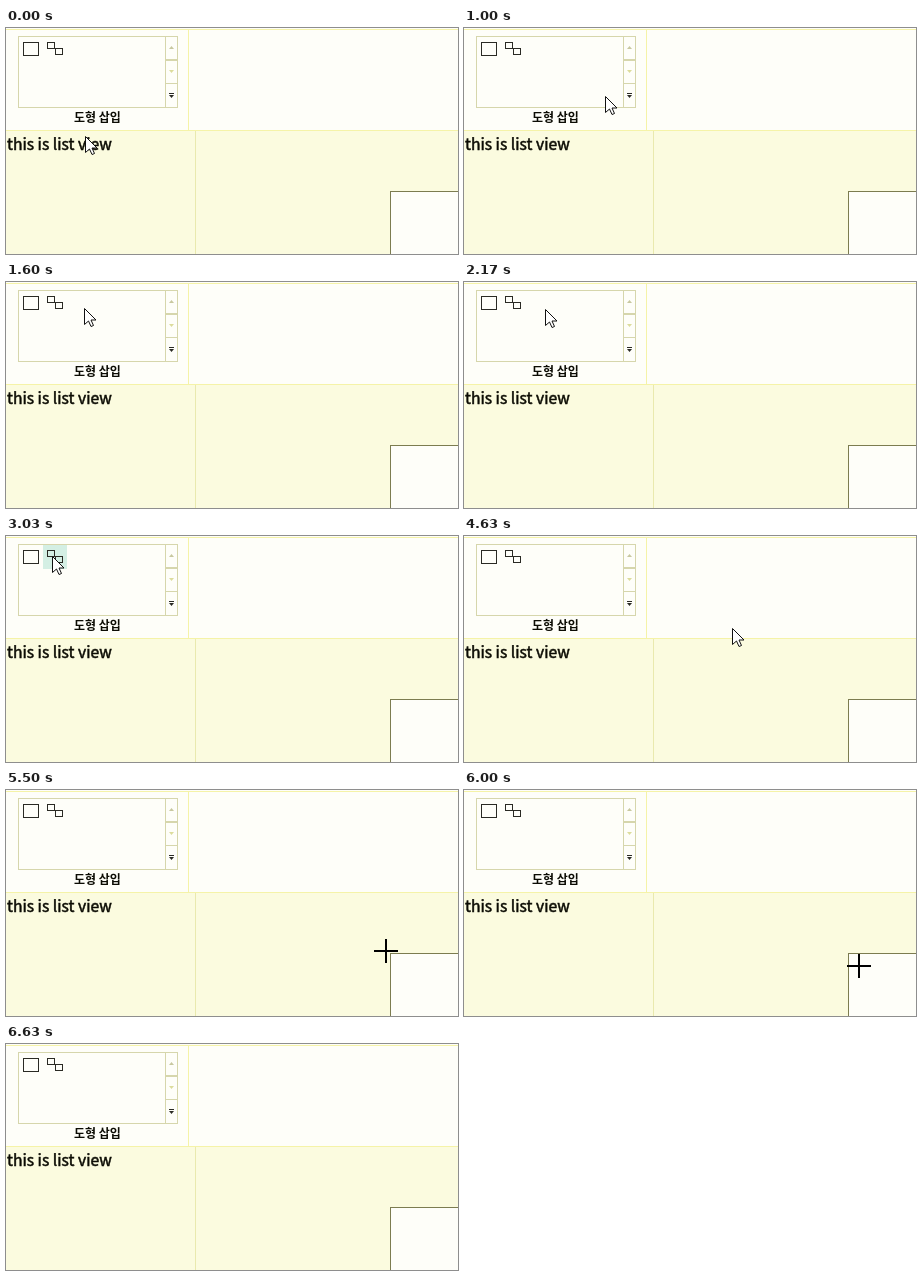
Write an HTML page with a canvas that moves like this. It is 452 px wide and 226 px high and loops after 7760 ms.

```html
<!DOCTYPE html>
<html lang="ko">
<head>
<meta charset="utf-8">
<title>Shape gallery</title>
<style>
  html, body { margin: 0; width: 100%; height: 100%; overflow: hidden; background: #fbfbdf; }
  canvas { display: block; }
</style>
</head>
<body>
<canvas id="stage" width="452" height="226"></canvas>
<script>
const ctx = document.getElementById('stage').getContext('2d');
const LOOP = 7760, CROSS_START = 5500, POINTER_END = 6630;
const PANEL = '#fefef9', WORKSPACE = '#fbfbdf', DIVIDER = '#f5f3a8', FRAME = '#d6d6ac';
const INK = '#2a2a24', PAGE_EDGE = '#7c7c50';

// Turning points of the arrow's path
const TURNS = [
  { t: 400, x: 79, y: 108 }, { t: 600, x: 75, y: 132 }, { t: 1000, x: 141, y: 68 },
  { t: 1170, x: 130, y: 56 }, { t: 1600, x: 78, y: 26 }, { t: 1850, x: 52, y: 22 },
  { t: 2350, x: 97, y: 30 }, { t: 2770, x: 41, y: 38 }, { t: 3030, x: 46, y: 20 },
  { t: 3930, x: 46, y: 20 }, { t: 4630, x: 268, y: 92 }, { t: 5270, x: 373, y: 147 }
];

const progress = (time, from, to) => Math.min(1, Math.max(0, (time - from) / (to - from)));

function arrowAt(time) {
  let { x, y } = TURNS[0];
  for (let i = 1; i < TURNS.length; i++) {
    const a = TURNS[i - 1], b = TURNS[i], k = progress(time, a.t, b.t);
    x += (b.x - a.x) * k;
    y += (b.y - a.y) * k;
  }
  return { x: Math.round(x), y: Math.round(y) };
}

// The cross slides diagonally in two strokes
function crossAt(time) {
  const slide = Math.round(19 * progress(time, CROSS_START, 6130) + 6 * progress(time, 6270, 6370));
  return { x: 380 + slide, y: 161 + slide };
}

function fill(color, x, y, w, h) {
  ctx.fillStyle = color;
  ctx.fillRect(x, y, w, h);
}

function outline(color, x, y, w, h) {
  ctx.lineWidth = 1;
  ctx.strokeStyle = color;
  ctx.strokeRect(x + 0.5, y + 0.5, w - 1, h - 1);
}

// Small triangle; a negative height points it up
function triangle(color, y, height) {
  ctx.fillStyle = color;
  ctx.beginPath();
  ctx.moveTo(163, y);
  ctx.lineTo(168, y);
  ctx.lineTo(165.5, y + height);
  ctx.fill();
}

function label(text, x, y, font, weight = 0) {
  ctx.font = `${font} "Noto Sans CJK KR", "Noto Sans CJK", sans-serif`;
  ctx.fillStyle = ctx.strokeStyle = '#0c0c04';
  ctx.fillText(text, x, y);
  if (weight) {
    ctx.lineWidth = weight;
    ctx.strokeText(text, x, y);
  }
}

function drawGallery(hovered) {
  outline(FRAME, 12, 8, 160, 72);
  for (const y of [8, 31, 55]) outline(FRAME, 159, y, 13, 25);
  triangle('#c8c8a0', 21, -3);
  triangle('#dcdc9c', 42, 3);
  triangle(INK, 67, 3);
  fill(INK, 163, 65, 5, 1);

  if (hovered) fill('#d4efe4', 37, 9, 24, 24);
  outline(INK, 17, 14, 16, 14);
  outline(INK, 41, 14, 8, 7);
  outline(INK, 49, 20, 8, 7);
  label('도형 삽입', 68, 94, 'bold 12px');
}

function drawWindow(hovered) {
  fill(WORKSPACE, 0, 0, 452, 226);
  fill(PANEL, 0, 0, 452, 102);
  fill(DIVIDER, 0, 1, 452, 1);
  fill(DIVIDER, 182, 2, 1, 100);
  fill(DIVIDER, 0, 102, 452, 1);
  fill('#e9e9ae', 189, 103, 1, 123);
  drawGallery(hovered);
  label('this is list view', 1, 122, '15.7px', 0.5);
  fill(PANEL, 384, 163, 68, 63);
  fill(PAGE_EDGE, 384, 163, 68, 1);
  fill(PAGE_EDGE, 384, 163, 1, 63);
}

const ARROW = new Path2D('M0 0V16L4 12.5L6.5 18L9 17L6.5 11.5H11.5Z');

function drawArrow({ x, y }) {
  ctx.save();
  ctx.translate(x + 0.5, y + 0.5);
  ctx.lineWidth = 1;
  ctx.fillStyle = '#fff';
  ctx.strokeStyle = '#111';
  ctx.fill(ARROW);
  ctx.stroke(ARROW);
  ctx.restore();
}

function drawCross({ x, y }) {
  fill('#000', x - 12, y - 1, 24, 2);
  fill('#000', x - 1, y - 12, 2, 24);
}

function render(now) {
  const time = now % LOOP;
  const arrow = arrowAt(time);
  const hovered = arrow.x >= 37 && arrow.x < 61 && arrow.y >= 9 && arrow.y < 33;
  drawWindow(hovered);
  if (time < CROSS_START) drawArrow(arrow);
  else if (time < POINTER_END) drawCross(crossAt(time));
}

let start;
function tick(now) {
  start ??= now;
  render(now - start);
  requestAnimationFrame(tick);
}
render(0);
requestAnimationFrame(tick);
</script>
</body>
</html>
```
